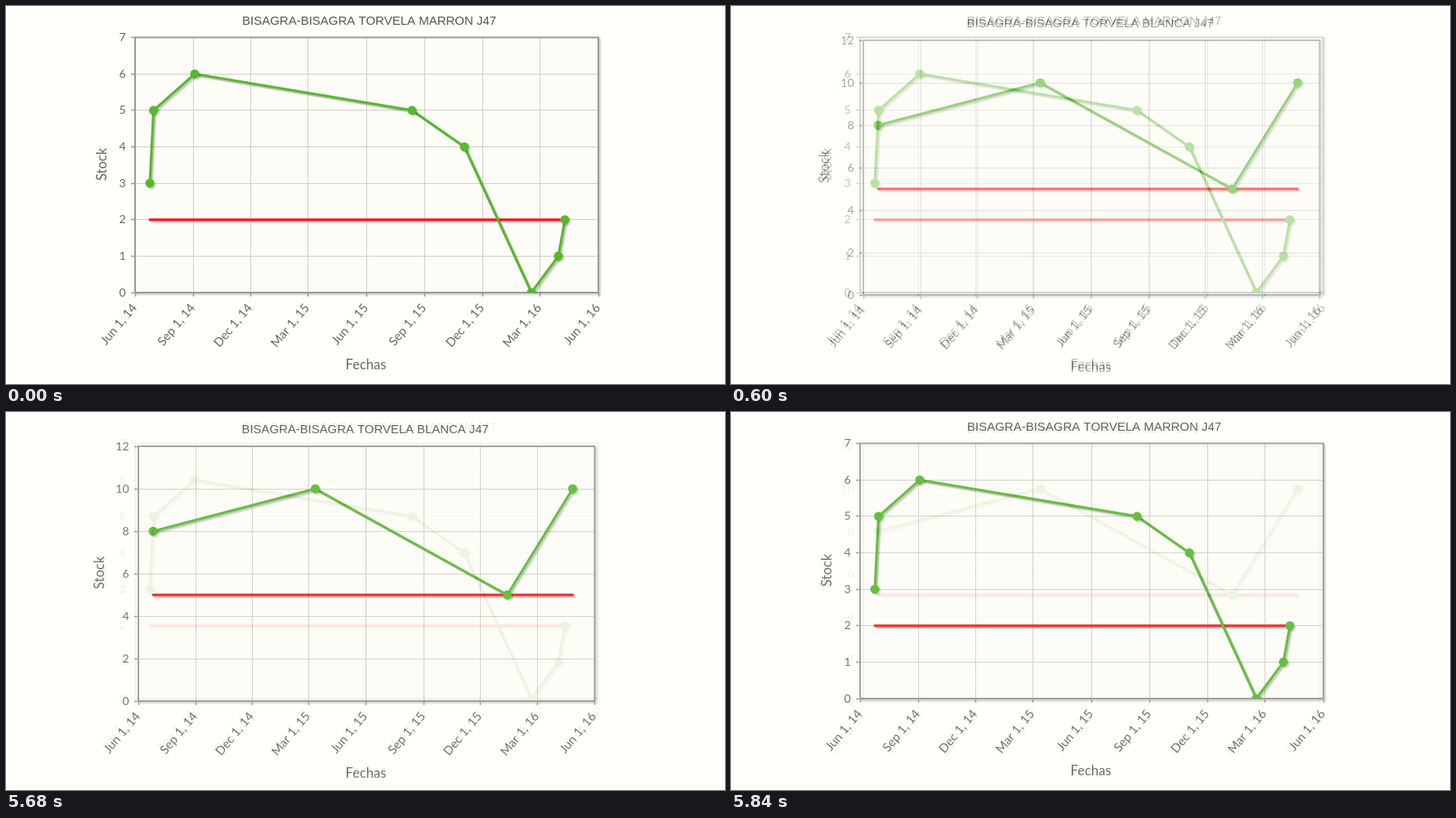
An HTML page with a canvas for the animation above (5860 ms loop, 880 by 463 pixels).

```html
<!DOCTYPE html>
<html lang="es">
<head>
<meta charset="utf-8">
<style>
  html, body { margin: 0; width: 100%; height: 100%; overflow: hidden; background: #fffffb; }
  canvas { position: absolute; left: 0; top: 0; }
</style>
</head>
<body>
<canvas id="white" width="880" height="463"></canvas>
<canvas id="brown" width="880" height="463"></canvas>
<script>
const DATES = ["Jun 1, 14", "Sep 1, 14", "Dec 1, 14", "Mar 1, 15", "Jun 1, 15",
               "Sep 1, 15", "Dec 1, 15", "Mar 1, 16", "Jun 1, 16"];
const DAYS = [0, 92, 183, 273, 365, 457, 548, 639, 731];

const brown = {
  id: "brown", title: "BISAGRA-BISAGRA TORVELA MARRON J47", titleX: 289, titleSize: 15,
  left: 158, right: 725, top: 38.5, bottom: 351, max: 7, step: 1, limit: 2, labelX: 123,
  data: [[176, 3], [180.5, 5], [231, 6], [497, 5], [561, 4], [643, 0], [676, 1], [684, 2]]
};
const white = {
  id: "white", title: "BISAGRA-BISAGRA TORVELA BLANCA J47", titleX: 288.5, titleSize: 14.9,
  left: 162, right: 720.5, top: 42, bottom: 354, max: 12, step: 2, limit: 5, labelX: 120,
  data: [[180, 8], [378.5, 10], [613.5, 5], [693.5, 10]]
};

function drawChart(c) {
  const g = document.getElementById(c.id).getContext("2d");
  const yOf = v => c.bottom - v * (c.bottom - c.top) / c.max;
  const xOf = d => c.left + d * (c.right - c.left) / 731;

  function text(s, x, y, size, align, angle = 0, font = "Lato, 'Open Sans'", color = "#666") {
    g.save();
    g.translate(x, y);
    g.rotate(angle * Math.PI / 180);
    g.font = `${size}px ${font}, sans-serif`;
    g.textAlign = align;
    g.fillStyle = color;
    g.fillText(s, 0, 0);
    g.restore();
  }

  function stroke(points, color, width) {
    g.beginPath();
    points.forEach(([x, y]) => g.lineTo(x, y));
    g.strokeStyle = color;
    g.lineWidth = width;
    g.stroke();
  }

  // Calls paint three times, each a little further down and right.
  function shadow(paint, alpha) {
    for (let i = 1; i <= 3; i++) {
      g.save();
      g.translate(i * 0.9, i * 0.9);
      paint(`rgba(0,0,0,${alpha})`);
      g.restore();
    }
  }

  function dots(points, color) {
    g.fillStyle = color;
    for (const [x, y] of points) {
      g.beginPath();
      g.arc(x, y, 5.5, 0, 7);
      g.fill();
    }
  }

  function series(points, color) {
    shadow(shade => stroke(points, shade, 3), 0.1);
    stroke(points, color, 3);
  }

  g.fillStyle = "#fffffb";
  g.fillRect(0, 0, 880, 463);
  text(c.title, c.titleX, c.bottom - 328, c.titleSize, "left", 0, "'Liberation Sans', Arial", "#555");
  text("Stock", c.labelX, c.bottom - 157, 16.5, "center", -90);
  text("Fechas", 440.5, c.bottom + 94, 16.5, "center");

  const w = c.right - c.left, h = c.bottom - c.top;
  const frame = color => {
    g.strokeStyle = color;
    g.lineWidth = 2;
    g.strokeRect(c.left, c.top, w, h);
  };
  shadow(frame, 0.08);
  g.fillStyle = "#fdfcf7";
  g.fillRect(c.left, c.top, w, h);

  for (let v = 0; v <= c.max; v += c.step) {
    const y = Math.floor(yOf(v)) + 0.5;
    stroke([[c.left, y], [c.right, y]], "#d0d0ca", 1);
    stroke([[c.left - 5, y], [c.left, y]], "#999", 1.5);
    text(v, c.left - 11.5, y + 4.5, 14, "right");
  }
  DAYS.forEach((d, i) => {
    const x = Math.floor(xOf(d)) + 0.5;
    stroke([[x, c.top], [x, c.bottom]], "#d0d0ca", 1);
    stroke([[x, c.bottom], [x, c.bottom + 5]], "#999", 1.5);
    text(DATES[i], x + 2.5, c.bottom + 19, 15, "right", -50);
  });
  frame("#999");

  g.beginPath();
  g.rect(c.left, c.top, w, h);
  g.clip();
  g.lineCap = g.lineJoin = "round";
  const points = c.data.map(([x, v]) => [x, yOf(v)]);
  const limitY = yOf(c.limit);
  series([[points[0][0], limitY], [points.at(-1)[0], limitY]], "#f81414");
  series(points, "#55b92c");
  shadow(shade => dots(points, shade), 0.07);
  dots(points, "#55b92c");
}

// Opacity of the brown chart, which lies over the white one.
function brownAlpha(t) {
  const fade = start => Math.min(10, Math.floor((t - start) / 20) + 1) / 10;
  if (t < 500) return 1;
  return t < 5680 ? 1 - fade(500) : fade(5680);
}

const top_ = document.getElementById("brown");
function tick(now) {
  top_.style.opacity = brownAlpha(now % 5860);
  requestAnimationFrame(tick);
}

drawChart(white);
drawChart(brown);
requestAnimationFrame(tick);
</script>
</body>
</html>
```
